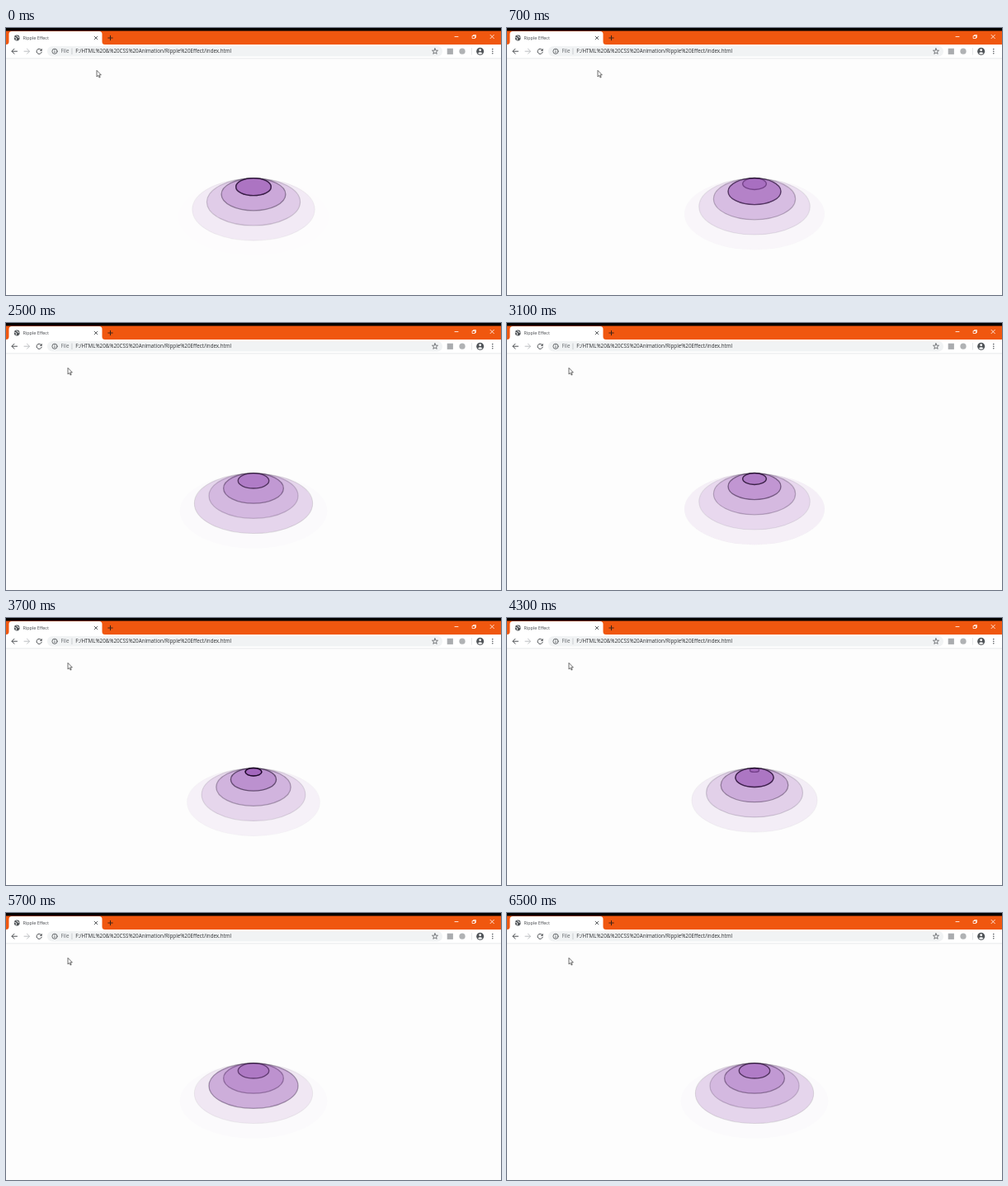
An HTML page for the animation above (6.6 s loop, 600 by 323 pixels).

```html
<!DOCTYPE html>
<html lang="en">
<head>
<meta charset="utf-8">
<title>Ripple Effect</title>
<style>
  html, body { margin: 0; width: 100%; height: 100%; overflow: hidden; background: #fdfdfd; }
  svg { display: block; width: 100vw; height: 100vh; }
  text { font-family: "Open Sans", "Noto Sans", sans-serif; }
  .line { fill: none; stroke-linecap: round; stroke-linejoin: round; }
  .dark { stroke: #4a4d51; }
  .white { stroke: #fff; }
</style>
</head>
<body>
<svg viewBox="0 0 600 323" preserveAspectRatio="none">
  <rect width="600" height="323" fill="#fdfdfd"/>

  <!-- title bar and tab -->
  <rect width="600" height="4" fill="#000"/>
  <rect y="3.5" width="600" height="16.5" fill="#f0570f"/>
  <path d="M0 20Q3.5 20 3.5 16.5V7.5Q3.5 4 7 4H113Q116.500 4 116.500 7.500V16.500Q116.500 20 120 20Z" fill="#fff"/>
  <circle cx="13.200" cy="12" r="3.400" fill="#4f5357"/>
  <path d="M10.500 11.200L12.700 12.300L12.200 14.400M13 9.500L14 11L15.800 11.200" class="line" stroke="#fff" stroke-width=".9"/>
  <text x="20.600" y="13.900" font-size="5.400" fill="#45484c">Ripple Effect</text>
  <path d="M107.200 10.200L110.800 13.800M110.800 10.200L107.200 13.800" class="line dark" stroke-width=".9"/>
  <path d="M123.800 12H129.200M126.500 9.300V14.700" class="line" stroke="#3c2418" stroke-width="1"/>
  <path d="M544 10.500H548M565.500 9.500H568.500V12.500H565.500ZM566.500 9.300V8.500H569.500V11.500H568.700M587 8.300L591.400 12.700M591.400 8.300L587 12.700" class="line white" stroke-width=".8"/>

  <!-- toolbar -->
  <rect y="20" width="600" height="16.500" fill="#fff"/>
  <rect y="36.500" width="600" height=".8" fill="#e4e5e7"/>
  <rect x="50" y="22" width="479" height="12.500" rx="6.250" fill="#f1f3f4"/>
  <path d="M13.500 28.200H7.200M10 25.200L7 28.200L10 31.200" class="line dark" stroke-width="1"/>
  <path d="M22 28.200H28.300M25.500 25.200L28.500 28.200L25.500 31.200" class="line" stroke="#bcbec1" stroke-width="1"/>
  <path d="M42.600 26.300A3.100 3.100 0 1 0 43.200 29.200" class="line dark" stroke-width="1"/>
  <path d="M43.700 24.700V27.800H40.600Z" fill="#4a4d51"/>
  <circle cx="59" cy="28.200" r="3.100" class="line dark" stroke-width=".8"/>
  <path d="M59 28V29.800M59 26.500V26.600" class="line dark" stroke-width=".8"/>
  <text x="66.500" y="30.400" font-size="6.250" fill="#63676b">File</text>
  <rect x="79.600" y="24.500" width=".7" height="7.500" fill="#b9bcc0"/>
  <text x="84.300" y="30.400" font-size="6.250" fill="#2c2e31">F:/HTML%20&amp;%20CSS%20Animation/Ripple%20Effect/index.html</text>
  <path d="M520 24.700L520.900 27.100L523.500 27.200L521.500 28.800L522.200 31.300L520 29.900L517.800 31.300L518.500 28.800L516.500 27.200L519.100 27.100Z" class="line dark" stroke-width=".7"/>
  <rect x="534.700" y="24.700" width="7.200" height="7.200" fill="#aaacaf"/>
  <circle cx="553" cy="28.200" r="3.600" fill="#b0b2b4"/>
  <rect x="564" y="24" width=".6" height="8.500" fill="#d5d7d9"/>
  <circle cx="574.700" cy="28.200" r="4.500" fill="#505458"/>
  <circle cx="574.700" cy="26.700" r="1.400" fill="#fff"/>
  <path d="M571.900 30.700Q574.700 28 577.500 30.700Q574.700 33 571.900 30.700Z" fill="#fff"/>
  <g fill="#505458">
    <circle cx="589.800" cy="25.600" r=".8"/><circle cx="589.800" cy="28.200" r=".8"/><circle cx="589.800" cy="30.800" r=".8"/>
  </g>

  <g id="rings" fill="#9b59b6" stroke="#12001c"></g>
  <path id="cursor" d="M0 0V7.600L1.800 6L3 8.700L4.200 8.200L3 5.500H5.300Z" fill="#fff" stroke="#333" stroke-width=".7" stroke-linejoin="round"/>
</svg>
<script>
  const LOOP = 6600, STEP = 100, LIFE = 4000, DELAY = 800, COUNT = 6;
  const clockPath = [[0, 772], [700, 1256], [LOOP, 7156]];
  const xPath = [[1000, 110], [1800, 84], [2200, 75]];
  const yPath = [[1000, 51.3], [1800, 53.3], [2200, 54.3]];

  // Piecewise linear value at time t, held at both ends
  function along(path, t) {
    if (t <= path[0][0]) return path[0][1];
    for (let i = 1; i < path.length; i++) {
      const [t0, a] = path[i - 1], [t1, b] = path[i];
      if (t <= t1) return a + (b - a) * (t - t0) / (t1 - t0);
    }
    return path[path.length - 1][1];
  }

  function set(el, attrs) {
    for (const name in attrs) el.setAttribute(name, attrs[name]);
  }

  const group = document.getElementById('rings');
  const cursor = document.getElementById('cursor');
  // The first and last rings run in step, one below and one above the rest
  const rings = Array.from({ length: COUNT }, () =>
    group.appendChild(document.createElementNS(group.namespaceURI, 'ellipse')));

  function drawRing(el, p) {
    const r = 5 + 88 * p, fade = 1 - p, line = 1 + 0.5 * fade;
    const ry = r * 0.51;
    set(el, {
      cx: 300, cy: 180.7 + 0.01 * r + ry,
      rx: r - line / 2, ry: ry - line / 2,
      'fill-opacity': 0.52 * fade,
      'stroke-opacity': fade * fade,
      'stroke-width': line
    });
  }

  const start = performance.now();
  function frame() {
    const t = Math.floor((performance.now() - start) % LOOP / STEP) * STEP;
    const clock = along(clockPath, t) + LIFE;
    rings.forEach((el, i) => drawRing(el, (clock - i * DELAY) % LIFE / LIFE));
    set(cursor, { transform: `translate(${along(xPath, t)} ${along(yPath, t)})` });
    requestAnimationFrame(frame);
  }
  frame();
</script>
</body>
</html>
```
